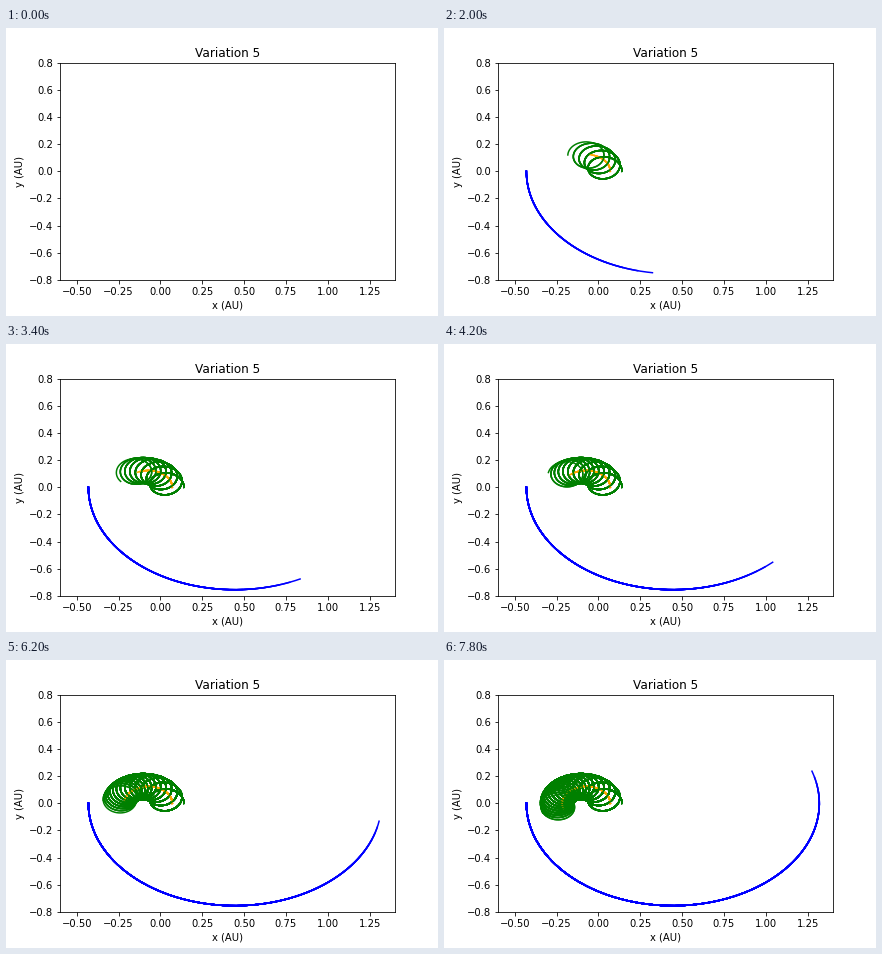
Recreate the animation shown at these times as a matplotlib script. Size 432 by 288 pixels, loop 8 s.

```python
import numpy as np
import matplotlib.pyplot as plt
from matplotlib.animation import FuncAnimation

FRAMES = 40
SAMPLES = 50           # points per frame step
MASS_RATIO = 0.164     # outer body / inner pair


def kepler(t, rate, a, e):
    """Ellipse around a focus at the origin, periapsis on +x at t = 0."""
    mean = rate * t
    ecc = mean + e * np.sin(mean)
    for _ in range(12):
        ecc -= (ecc - e * np.sin(ecc) - mean) / (1 - e * np.cos(ecc))
    x = a * (np.cos(ecc) - e)
    y = a * np.sqrt(1 - e * e) * np.sin(ecc)
    return np.array([x, y])


t = np.arange((FRAMES - 1) * SAMPLES + 1) / SAMPLES
outer = -kepler(t, 0.0928, 0.875, 0.508)
star = -MASS_RATIO * outer
planet = star + kepler(t, 2 * np.pi * 0.4505, 0.1, 0.3)

fig, ax = plt.subplots(figsize=(6, 4), dpi=72, facecolor="white")
fig.subplots_adjust(left=0.125, right=0.9, bottom=0.125, top=0.88)
ax.set_xlim(-0.6, 1.4)
ax.set_ylim(-0.8, 0.8)
ax.set_xlabel("x (AU)")
ax.set_ylabel("y (AU)")
ax.set_title("Variation 5")

# Every step draws the whole trail again, so older parts grow heavier.
layers = []
for step in range(FRAMES):
    end = step * SAMPLES + 1
    layers.append([
        ax.plot(*path[:, :end], color=color, lw=1.5, visible=False)[0]
        for path, color in ((star, "orange"), (planet, "green"), (outer, "blue"))
    ])


def update(frame):
    for step, lines in enumerate(layers):
        for line in lines:
            line.set_visible(0 < step <= frame)
    return [line for lines in layers for line in lines]


anim = FuncAnimation(fig, update, frames=FRAMES, init_func=lambda: update(0),
                     interval=200, repeat=True, repeat_delay=0, blit=False)
plt.show()
```
